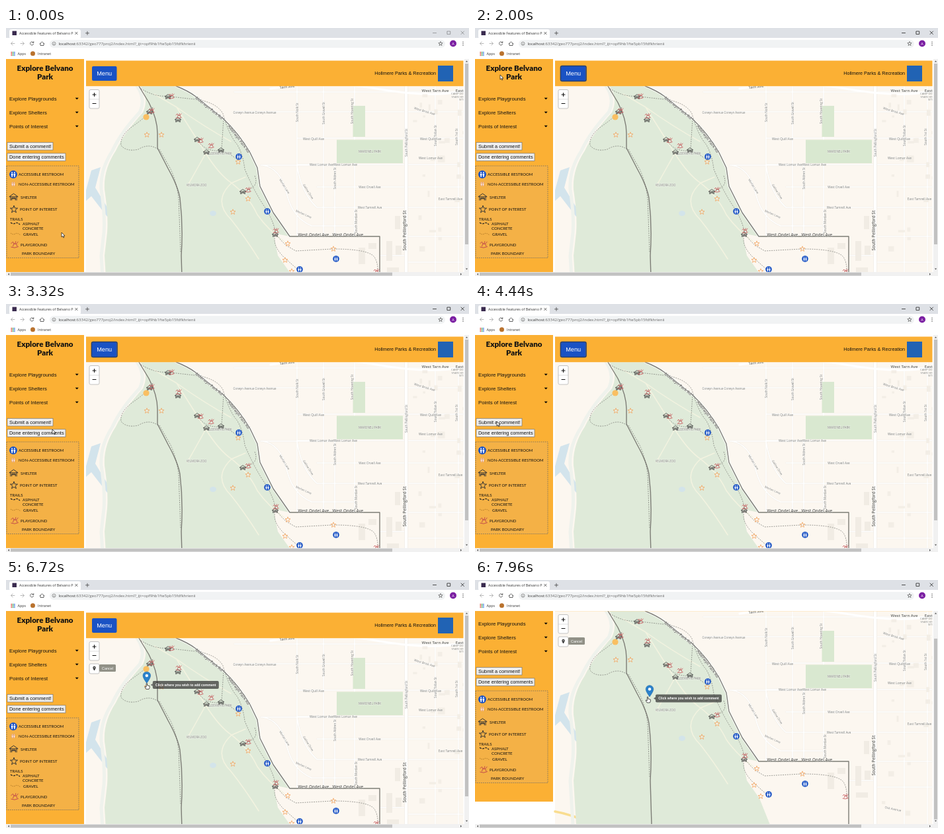
An HTML page that plays this animation: 700x376 px, repeating every 8000 ms.

```html
<!DOCTYPE html>
<html lang="en">
<head>
<meta charset="utf-8">
<title>Park map</title>
<style>
  html, body { margin: 0; width: 100%; height: 100%; overflow: hidden; background: #fff; }
  svg { display: block; width: 700px; height: 376px; }
  text { font-family: "Liberation Sans", Arial, sans-serif; fill: #111; }
  .chrome text, #status text { font-family: "Open Sans", sans-serif; fill: #333; }
  .chrome .faint { fill: #666; }
  .legend text { font: 6px Lato, sans-serif; }
  .title { font: 900 11.6px Lato, sans-serif; }
  .labels text { font-family: "Open Sans", sans-serif; fill: #7c7c77; text-anchor: middle;
    stroke: #fff; stroke-opacity: .6; stroke-width: .8px; paint-order: stroke; }
  .labels .bold { fill: #62625d; font-weight: 600; }
  .line { fill: none; stroke-linejoin: round; stroke-linecap: round; }
  .dash { stroke-linecap: butt; }
</style>
</head>
<body>
<svg id="stage" viewBox="0 0 700 376"></svg>
<script>
const ORANGE = '#fbb034', BLUE = '#1a52c4';
const text = (x, y, s, size, extra = '') => `<text x="${x}" y="${y}" font-size="${size}" ${extra}>${s}</text>`;
const rect = (x, y, w, h, fill, extra = '') => `<rect x="${x}" y="${y}" width="${w}" height="${h}" fill="${fill}" ${extra}/>`;
const path = (d, stroke, width, dash = '') =>
  `<path class="line ${dash && 'dash'}" d="${d}" stroke="${stroke}" stroke-width="${width}" stroke-dasharray="${dash}"/>`;
const use = (id, x, y, scale = 1) => `<use href="#${id}" transform="translate(${x} ${y}) scale(${scale})"/>`;
const places = (id, points) => points.map(([x, y]) => use(id, x, y)).join('');
const label = (x, y, s, size = 5, turn = 0, cls = '') =>
  text(0, size * .35, s, size, `class="${cls}" transform="translate(${x} ${y}) rotate(${turn})"`);

const starPoints = Array.from({ length: 10 }, (_, i) => {
  const r = i % 2 ? 1.7 : 4.2, a = i * Math.PI / 5;
  return `${(r * Math.sin(a)).toFixed(2)},${(-r * Math.cos(a)).toFixed(2)}`;
}).join(' ');

const person = x => `<circle cx="${x}" cy="-2.2" r=".8"/><path d="M${x - 1} -1.1h2v2.3h-.4v2h-1.2v-2h-.4z"/>`;

const defs = `<defs>
  <clipPath id="view">${rect(0, 47, 693, 323, '#000')}</clipPath>
  <clipPath id="mainClip">${rect(0, 0, 691.5, 420, '#000')}</clipPath>
  <clipPath id="tabClip">${rect(18, 0, 85, 15, '#000')}</clipPath>
  <g id="star"><polygon points="${starPoints}" fill="#fff" fill-opacity=".3" stroke="#f2a25c" stroke-width=".8"/></g>
  <g id="restroom"><circle r="4.8" fill="${BLUE}"/><g fill="#fff">${person(-1.5)}${person(1.5)}</g></g>
  <g id="shelter">${path('M-4.5 -.3L0 -3.5L4.5 -.3ZM-3.3 0V3.6M3.3 0V3.6M-2 3.5V1.2H2V3.5M-2 2H2', '#333', .7)}</g>
  <g id="play">${path('M-4 -1L-2 -3L-.8 -.6H2L4 -3M-2 2.2L-.8 -.6M3 2.2L2 -.6M-4 3.2Q0 5 4.2 2.8M.5 -.6L1.4 -3.4', '#c2494c', .75)}</g>
</defs>`;

function buildings() {
  let seed = 7, out = '';
  const random = () => (seed = seed * 16807 % 2147483647) / 2147483647;
  for (let i = 0; i < 110; i++) {
    const x = 615 + random() * 190, y = 100 + random() * 300;
    out += rect(x.toFixed(1), y.toFixed(1), (3 + random() * 8).toFixed(1), (3 + random() * 7).toFixed(1), '#f3eee6');
  }
  return out + [[533, 333, 10, 25], [548, 326, 12, 9], [575, 323, 9, 30], [589, 330, 9, 14], [576, 363, 18, 8], [588, 285, 8, 20]]
    .map(b => rect(...b, '#f1ece4')).join('');
}

function streets() {
  const rows = [97, 127, 167, 207, 241, 272].map(y => `M${y < 130 ? 345 : y < 210 ? 440 : 470} ${y}H810`).join('');
  const columns = [440, 480, 527, 649, 684, 713, 747, 791].map(x => `M${x} 88V${x < 600 ? 316 : 412}`).join('');
  const lanes = 'M385 208H500M388 208Q415 212 424 250T462 300H525M440 208Q446 250 470 272M497 207V316M565 345H605M605 316H810M605 355H810';
  return path(rows + columns + lanes, '#f0ebe3', 2.4) + path(rows + columns + lanes, '#fff', 1.6) +
    path('M605 88V412', '#ebe5da', 6) + path('M605 88V412', '#fff', 4.8) +
    path('M400 92Q480 78 560 92T690 96H810', '#fff', 3);
}

const labels = [
  [649, 95, 'West Tarn Ave', 6, 0, 'bold'], [699, 95, 'East Tarn Ave', 6, 0, 'bold'], [785, 95, 'East Tarn Ave', 6, 0, 'bold'],
  [689, 100, 'CAMP DORWICK', 4.2], [689, 104.5, 'STATE HISTORIC', 4.2], [689, 109, 'SITE', 4.2],
  [633, 126, 'West Brisk Ave', 4.8, 17], [709, 134, 'East Brisk Ave', 5], [425, 89, 'Tarn Ave', 5.5, -6, 'bold'],
  [376, 128, 'Corwyn Avenue  Corwyn Avenue', 4.4],
  [465, 168, 'West Quill Ave', 4.8], [642, 168, 'West Quill Ave', 4.8],
  [477, 207, 'West Lomar Ave', 4.8], [513, 207, 'West Lomar Ave', 4.8], [642, 197, 'West Lomar Ave', 4.8],
  [550, 241, 'West Orvell Ave', 4.6], [550, 272, 'West Tamrell Ave', 4.6], [672, 259, 'East Tamrell Ave', 4.8],
  [465, 314, 'West Ondel Ave', 6.2, 0, 'bold'], [517, 314, 'West Ondel Ave', 6.2, 0, 'bold'],
  [603, 307, 'South Pellingford St', 6.4, -90, 'bold'], [605, 174, 'South Pellingford St', 4.6, -90],
  [440, 128, 'South Nolk St', 4.6, -90], [480, 129, 'South Gravell St', 4.6, -90], [523, 126, 'South Hovering St', 4.6, -90],
  [497, 228, 'South Aldren St', 4.6, -90], [529, 293, 'South Mordan St', 4.6, -90],
  [649, 163, 'South Tollan St', 4.6, -90], [681, 165, 'South 1st St', 4.6, -90],
  [713, 205, 'South 2nd St', 4.8, -90], [715, 316, 'South 2nd St', 4.8, -90], [747, 130, 'South 3rd St', 4.8, -90],
  [747, 210, 'South 3rd St', 4.8, -90], [791, 209, 'South 5th St', 4.8, -90],
  [421, 240, 'Morlan Lane', 4.4, 58], [457, 248, 'Gatlow Drive', 4.4, 58], [450, 282, 'Morlan Lane', 4.4, 24],
  [632, 388, 'Osk Avenue', 4.6, 12],
  [307, 121, 'Alderwyn Park Rd', 6, 39, 'bold'], [352, 168, 'Alderwyn Park Rd', 6, 53, 'bold'],
  [323, 190, 'ALDERWYN PARK', 4.6], [288, 238.5, 'VELMORA ZOO', 4.4], [550, 187.5, 'MARONEL PARK', 4.6]
];

function parkMap() {
  const road = 'M257 88Q275 95 287 104L329 138Q352 160 369 189L380 212L384 240L404 280L429 316';
  const west = 'M201 88L216 113Q229 138 229 160V182L245 213Q260 240 263 258Q268 300 265 345L267 412';
  const trails = 'M222 120Q214 134 190 150Q172 164 174 178Q182 188 200 184Q216 174 230 184' +
    'M204 92Q226 105 243 103Q265 106 285 108Q318 112 328 130Q337 162 349 176Q358 190 361 214Q376 250 393 274Q405 294 408 312Q418 326 426 331L438 338L494 335Q545 335 556 346Q563 355 562 372' +
    'M290 170Q300 188 326 186Q340 191 350 200M329 137Q327 168 326 184M358 248Q384 242 376 224M408 312Q400 330 425 352L441 366' +
    'M232 184L249 214Q258 234 261 258L264 340';
  const innerRoads = 'M224 100L258 120L302 190Q322 222 341 235Q367 255 380 283Q396 306 421 324M258 120Q300 150 340 172M341 235Q312 262 340 290Q360 315 382 350M341 235L362 226M302 190L274 240';
  return rect(121, 88, 690, 324, '#fcf7f0') +
    path('M121 392Q150 397 180 413', '#f9dd90', 3.5) +
    `<path d="M121 246L129 216L143 211L135 242L158 280L153 286L129 255L121 262Z" fill="#d3e4ec"/>` +
    `<path d="M203 88Q217 105 207 128Q178 160 166 186Q147 215 149 245Q155 285 153 310L149 345L153 412H446L430 372L411 345L404 311L429 316L404 280L384 240L380 212L369 189L329 138L287 104L257 88Z" fill="#dfead9"/>` +
    path('M198 88Q212 107 202 128Q174 158 161 186Q142 215 144 245Q150 285 148 310L144 345L148 412', '#eff2ec', 5) +
    streets() + buildings() +
    rect(500, 169.5, 100, 35.5, '#d9e8d0') + rect(524.5, 118, 18.5, 47, '#d9e8d0') +
    `<ellipse cx="313" cy="281" rx="5" ry="4" fill="#d3e4ea"/>` +
    path(innerRoads, '#f3f3e0', 1.5) + path(road, '#fff', 3) +
    path(road + 'H565V412', '#7d7d76', 1.4) + path(west, '#7d7d76', 1.4) +
    path(trails, '#6b6b66', .7, '1.8 1.6') +
    `<g class="labels">${labels.map(l => label(...l)).join('')}</g>` +
    `<circle cx="212" cy="135" r="4.6" fill="#f9bf62"/>` +
    places('star', [[213, 162], [235, 162], [351, 203], [366, 259], [343, 279], [426, 327], [495, 335], [422, 352], [432, 369]]) +
    places('shelter', [[245, 104], [217, 127], [260, 139], [289, 169], [303, 188], [325, 185], [358, 248], [407, 313]]) +
    places('play', [[250, 103], [220, 125], [261, 133], [294, 170], [310, 178], [366, 245], [408, 307], [560, 369]]) +
    places('restroom', [[352, 195], [395, 278], [499, 350], [444, 366]]);
}

function controls() {
  const box = (y, h) => rect(126, y, 15, h, '#fff', 'rx="2" stroke="#bbb" stroke-width=".9"');
  return box(93.5, 28.5) + path('M126 108H141', '#ccc', .6) +
    path('M131 101H136M133.5 98.5V103.5M131 114.5H136', '#111', 1.1) +
    `<g id="locate">${box(127, 15)}<path d="M133.5 137.5Q131.3 134.4 131.3 133A2.2 2.2 0 0 1 135.7 133Q135.7 134.4 133.5 137.5Z" fill="#333"/><circle cx="133.5" cy="133" r=".8" fill="#fff"/></g>` +
    `<g id="cancel">${rect(141, 128, 25, 11, '#919187', 'rx="1.5"')}${text(153.5, 135.6, 'Cancel', 5.4, 'text-anchor="middle" style="fill:#fff"')}</g>`;
}

function sidebar() {
  const menu = ['Explore Playgrounds', 'Explore Shelters', 'Points of Interest'].map((s, i) => {
    const y = 107 + 21 * i;
    return text(5, y + 2.7, s, 7.75) + `<path d="M104.7 ${y - 1.2}h5l-2.5 2.6z"/>`;
  }).join('');
  const button = (y, w, s) => rect(2, y, w, 11.5, '#efefef', 'stroke="#767676" stroke-width=".7"') + text(5, y + 8.2, s, 7.4);
  const legend = [[19, 224, 'ACCESSIBLE RESTROOM'], [19, 238.5, 'NON-ACCESSIBLE RESTROOM'], [22, 259, 'SHELTER'],
    [21, 277, 'POINT OF INTEREST'], [6, 292, 'TRAILS'], [25, 298.5, 'ASPHALT'], [25, 306, 'CONCRETE'],
    [26, 315, 'GRAVEL'], [22, 331, 'PLAYGROUND'], [24, 344, 'PARK BOUNDARY']];
  return text(59, 65, 'Explore Belvano', 12, 'class="title" text-anchor="middle"') +
    text(59, 78, 'Park', 12, 'class="title" text-anchor="middle"') + menu +
    button(173.5, 69, 'Submit a comment!') + button(190, 88, 'Done entering comments') +
    rect(1, 209, 109, 139.5, '#f4b146', 'stroke="#666" stroke-width=".8" stroke-dasharray="1.5 1.5"') +
    `<g class="legend">${legend.map(l => text(...l, 6)).join('')}</g>` +
    use('restroom', 11, 222, 1.25) + `<g transform="translate(11 236.5)" fill="#fff" stroke="#c66" stroke-width=".3">${person(-1.4)}${person(1.4)}</g>` +
    use('shelter', 11.5, 256, 1.4) + `<polygon points="${starPoints}" transform="translate(12 275) scale(1.4)" fill="none" stroke="#333" stroke-width=".7"/>` +
    use('play', 13, 328, 1.3) + path('M7 295Q11 298 14 296T21 298', '#222', 1.1, '3 1.4') +
    path('M7 311Q11 314 14 312T22 314', '#a06a20', .9, '1.4 1.4');
}

function browser() {
  const dots = Array.from({ length: 9 }, (_, i) =>
    rect(7.5 + i % 3 * 2.3, 36 + (i / 3 | 0) * 2.3, 1.6, 1.6, ['#e34b3d', '#3f9d55', '#4a82e8'][i % 3])).join('');
  return `<g class="chrome">` + rect(0, 0, 700, 47, '#fff') + rect(0, 0, 700, 15, '#dee1e6') +
    rect(5, 2, 108, 14, '#fff', 'rx="3"') + rect(9.5, 4.5, 6.5, 6.5, '#3a2b4f') +
    `<g clip-path="url(#tabClip)">${text(20, 9.8, 'Accessible Features of Belvano P', 5.4)}</g>` +
    path('M104.7 6.2l3.4 3.4m0 -3.4l-3.4 3.4M120.5 7.8h5M123 5.3v5', '#444', .8) +
    `<g id="windowButtons">${path('M645.5 7.5h5M667.3 5h4.4v4.4h-4.4zM688 5l4.5 4.5m0 -4.5l-4.5 4.5', '#222', .8)}</g>` +
    path('M13 23.5H7.5l2.5 -2.5M7.5 23.5l2.5 2.5M22 23.5h5.5l-2.5 -2.5M27.5 23.5l-2.5 2.5', '#b0b0b0', .9) +
    path('M41.4 22A2.6 2.6 0 1 0 41.6 24.5M41.8 20.6V22.4H40M51 24l3.5 -3 3.5 3M52 23.5V26.5H57V23.5', '#555', .9) +
    rect(66, 18, 598, 12, '#f1f3f4', 'rx="6"') + `<circle cx="72.5" cy="23.7" r="2.5" fill="none" stroke="#666" stroke-width=".7"/>` +
    path('M72.5 23.5v1.5', '#666', .7) +
    text(79.5, 25.9, 'localhost<tspan class="faint">:63342/geo777proj2/index.html?_ijt=opf9hb1fte5pb15fdfkhrienii</tspan>', 6.08) +
    `<polygon points="${starPoints}" transform="translate(657 23.8) scale(.8)" fill="none" stroke="#555" stroke-width=".9"/>` +
    `<circle cx="676" cy="23.5" r="5" fill="#7b1fa2"/>` + text(676, 25.5, 'A', 5.4, 'text-anchor="middle" style="fill:#fff"') +
    `<g fill="#555"><circle cx="691" cy="21.2" r=".7"/><circle cx="691" cy="23.7" r=".7"/><circle cx="691" cy="26.2" r=".7"/></g>` +
    dots + text(17.5, 41, 'Apps', 5.4) + `<circle cx="40.5" cy="38.8" r="3.5" fill="#b9722e"/>` + text(48, 41, 'Intranet', 5.4) + `</g>`;
}

function scrollbars() {
  return rect(693, 47, 7, 323, '#f1f1f1') + rect(0, 370, 700, 6, '#f1f1f1') +
    `<rect id="thumb" x="694" y="54" width="5" height="274" fill="#c1c1c1"/>` +
    `<rect id="sideThumb" x="7" y="370.7" width="577" height="4.8" fill="#c1c1c1"/>` +
    `<path d="M694.8 51.5h3.4l-1.7 -2zM694.8 364.5h3.4l-1.7 2zM5 371.5v3.4l-2 -1.7zM687 371.5v3.4l2 -1.7z" fill="#555"/>`;
}

document.getElementById('stage').innerHTML = defs + rect(0, 0, 700, 376, '#fff') +
  `<g clip-path="url(#view)"><g id="page">
    <g clip-path="url(#mainClip)"><g id="main">
      ${parkMap()}${controls()}
      ${rect(121, 47, 800, 41.2, '#fff')}${rect(121, 49.5, 800, 38.7, ORANGE)}
      ${rect(130, 58, 37.5, 22, BLUE, 'rx="2"')}${text(148.7, 72.3, 'Menu', 9.2, 'text-anchor="middle" style="fill:#fff"')}
      <rect id="ring" x="129.4" y="57.4" width="38.7" height="23.2" rx="2.5" fill="none" stroke="#27406f" stroke-width="1.5"/>
    </g>
    ${text(650, 71, 'Hollmere Parks &amp; Recreation', 7.2, 'text-anchor="end"')}${rect(653, 57, 23, 24, '#2163b4')}</g>
    <rect id="panel" x="0" y="47" width="118" height="330" fill="${ORANGE}"/><g id="side">${sidebar()}</g>
  </g></g>` + scrollbars() +
  `<g id="status">${rect(0, 367, 186, 9, '#e3e5e8')}${text(2, 373.4, 'localhost:63342/geo777proj2/index.html?_ijt=opf9hb1fte5pb15fdfkhrienii#', 5.2)}</g>` +
  browser() +
  `<g id="pin">
    <path d="M0 0Q-5.8 -8 -5.8 -11.5A5.8 5.8 0 0 1 5.8 -11.5Q5.8 -8 0 0Z" fill="#2a81cb" stroke="#2268a5" stroke-width=".6"/><circle cy="-11.5" r="2.2" fill="#fff"/>
    ${rect(9, -3.5, 100, 12, '#333', 'rx="2" opacity=".72"')}<path d="M9 .5l-3 2 3 2z" fill="#666"/>
    ${text(59, 4.3, 'Click where you wish to add comment', 5.05, 'font-weight="bold" text-anchor="middle" style="fill:#fff"')}
  </g>
  <g id="cursor" fill="#fff" stroke="#111" stroke-width=".7" stroke-linejoin="round">
    <path id="arrow" d="M0 0V7L1.6 5.5L2.8 8L3.9 7.5L2.8 5.1H5Z"/>
    <path id="hand" d="M-.7 .4Q0 -.6 .7 .4V3.3L4.3 4.2V7L3.3 9H-.8L-3 5.5Q-2.5 4.5 -.7 6Z"/>
  </g>`;

// time, x, y of the pointer
const moves = [[0, 84, 310], [40, 84, 310], [320, 72, 188], [480, 72, 188], [720, 140, 65], [1000, 140, 65], [1040, 63, 63],
  [1200, 46, 68], [1400, 46, 68], [1440, 38, 71], [2360, 38, 71], [2560, 121, 200], [2800, 96, 280], [3160, 80, 230],
  [3320, 70, 190], [3680, 70, 190], [3920, 30, 177], [4360, 30, 177], [4440, 33, 178], [6280, 33, 178], [6400, 135, 132],
  [6560, 135, 132], [6800, 240, 165], [7000, 265, 190], [7600, 265, 190], [7680, 290, 206], [7740, 250, 226],
  [7800, 187, 180], [7860, 205, 105], [7920, 292, 130], [7960, 264, 177], [8000, 264, 177]];
const ease = p => (p = Math.min(1, Math.max(0, p)), p * p * (3 - 2 * p));

function pointer(t) {
  const i = moves.findIndex(m => m[0] > t), [t0, x0, y0] = moves[i - 1], [t1, x1, y1] = moves[i];
  const p = ease((t - t0) / (t1 - t0));
  return [x0 + (x1 - x0) * p, y0 + (y1 - y0) * p];
}

const el = id => document.getElementById(id);
const show = (id, on) => el(id).style.display = on ? '' : 'none';
const move = (id, x, y) => el(id).setAttribute('transform', `translate(${x} ${y})`);

function draw(now) {
  const t = Math.floor(now % 8000 / 40) * 40;
  const closed = t >= 1040 && t < 2000;
  const scroll = 41 * ease((t - 6720) / 200);
  const [x, y] = pointer(t);
  const hand = t >= 6360;

  move('page', 0, -scroll);
  move('main', closed ? -114 : 0, 0);
  el('panel').setAttribute('width', closed ? 5 : 118);
  el('thumb').setAttribute('y', 54 + scroll * .85);
  el('sideThumb').setAttribute('width', closed ? 671 : 577);
  el('windowButtons').style.opacity = t < 1000 ? .45 : 1;
  show('side', !closed);
  show('ring', t >= 1000 && t < 5880);
  show('locate', t >= 5880);
  show('cancel', t >= 6480);
  show('status', t >= 6360 && t < 6600);
  show('pin', t >= 6640);
  show('arrow', !hand);
  show('hand', hand);
  move('pin', x, y);
  move('cursor', x - (t >= 7600 ? 3 : 0), y);
  requestAnimationFrame(() => draw(performance.now() - start));
}
const start = performance.now();
draw(0);
</script>
</body>
</html>
```
